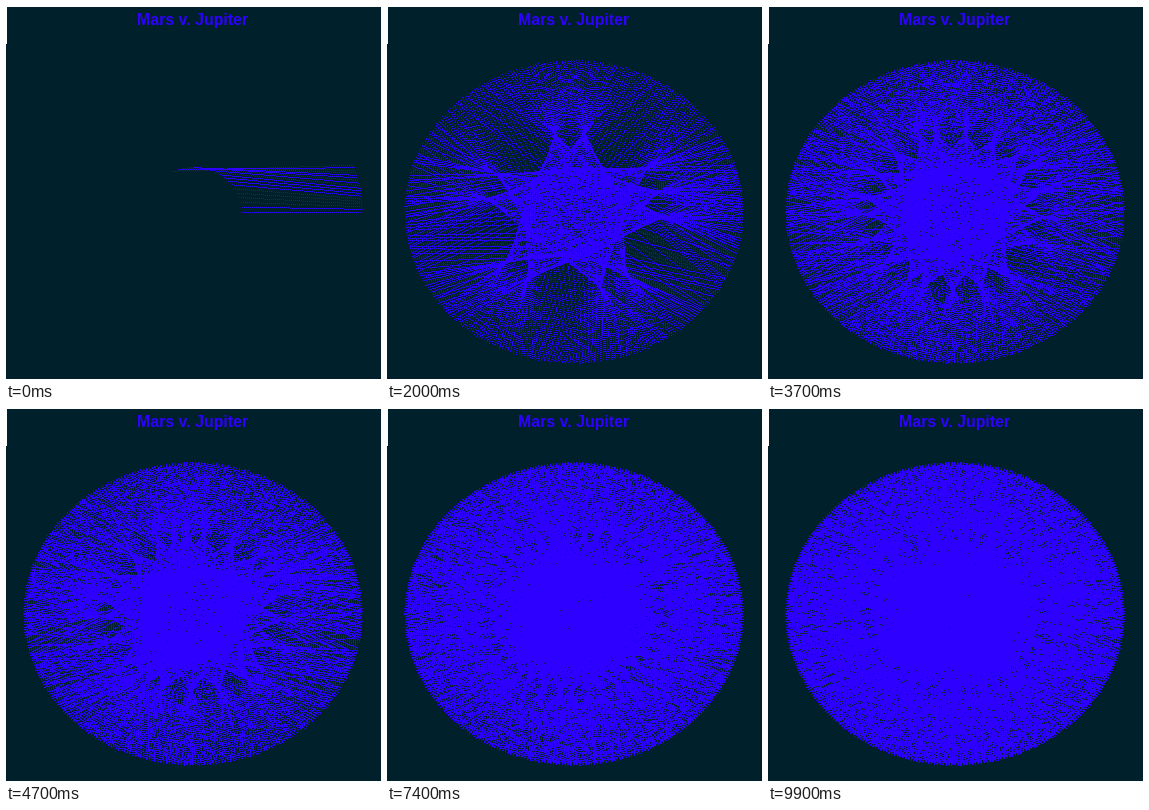
Recreate the animation shown at these times as a matplotlib script. Size 375 by 374 pixels, loop 10000 ms.

```python
import numpy as np
import matplotlib.pyplot as plt
from matplotlib.animation import FuncAnimation
from matplotlib.colors import to_rgb

W, H = 375, 374
FRAMES, INTERVAL = 100, 100
SKY, BLUE = "#00212b", "#2e00ff"

CENTER = np.array([187, 206])
RADII = np.array([169.5, -151.5])
MARS_ORBIT = 1.524 / 5.203  # relative to Jupiter's orbit
MARS_SPEED = 6.28           # Mars years in one Jupiter year

# One line per degree of Jupiter's orbit
FIRST_LINES, LINES_PER_FRAME = 18, 36


def orbit(angle, size=1):
    return CENTER + RADII * size * np.stack([np.cos(angle), np.sin(angle)], -1)


def reveal_map():
    """Frame number at which each pixel is first touched by a dotted line."""
    degrees = np.arange(FIRST_LINES + LINES_PER_FRAME * (FRAMES - 1) + 1)
    angle = np.radians(degrees)
    start = orbit(angle * MARS_SPEED, MARS_ORBIT)
    span = orbit(angle) - start

    # Every second pixel along the longer axis of each line
    length = np.abs(span).max(axis=1)[:, None]
    dist = np.arange(0, length.max(), 2)[None, :]
    dots = start[:, None] + span[:, None] * (dist / length)[..., None]
    visible = dist <= length
    x, y = np.floor(dots[visible]).astype(int).T

    when = np.ceil((degrees - FIRST_LINES) / LINES_PER_FRAME).clip(0)
    when = np.broadcast_to(when[:, None], visible.shape)[visible].astype(int)
    first = np.full((H, W), FRAMES)
    np.minimum.at(first, (y, x), when)
    return first


first_seen = reveal_map()
backdrop = np.tile(to_rgb(SKY), (H, W, 1))
backdrop[[0, -1], :] = 1
backdrop[:38, 0] = 1

fig = plt.figure(figsize=(W / 100, H / 100), dpi=100, facecolor=SKY)
ax = fig.add_axes([0, 0, 1, 1])
ax.axis("off")
picture = ax.imshow(backdrop, extent=(0, W, H, 0), aspect="auto",
                    interpolation="nearest")
ax.text(186.5, 19, "Mars v. Jupiter", color=BLUE, family="Liberation Sans",
        weight="bold", size=11.4, ha="center", va="baseline")


def draw(i):
    image = backdrop.copy()
    image[first_seen <= i] = to_rgb(BLUE)
    picture.set_data(image)
    return [picture]


anim = FuncAnimation(fig, draw, frames=FRAMES, interval=INTERVAL,
                     repeat=True, repeat_delay=0)
plt.show()
```
